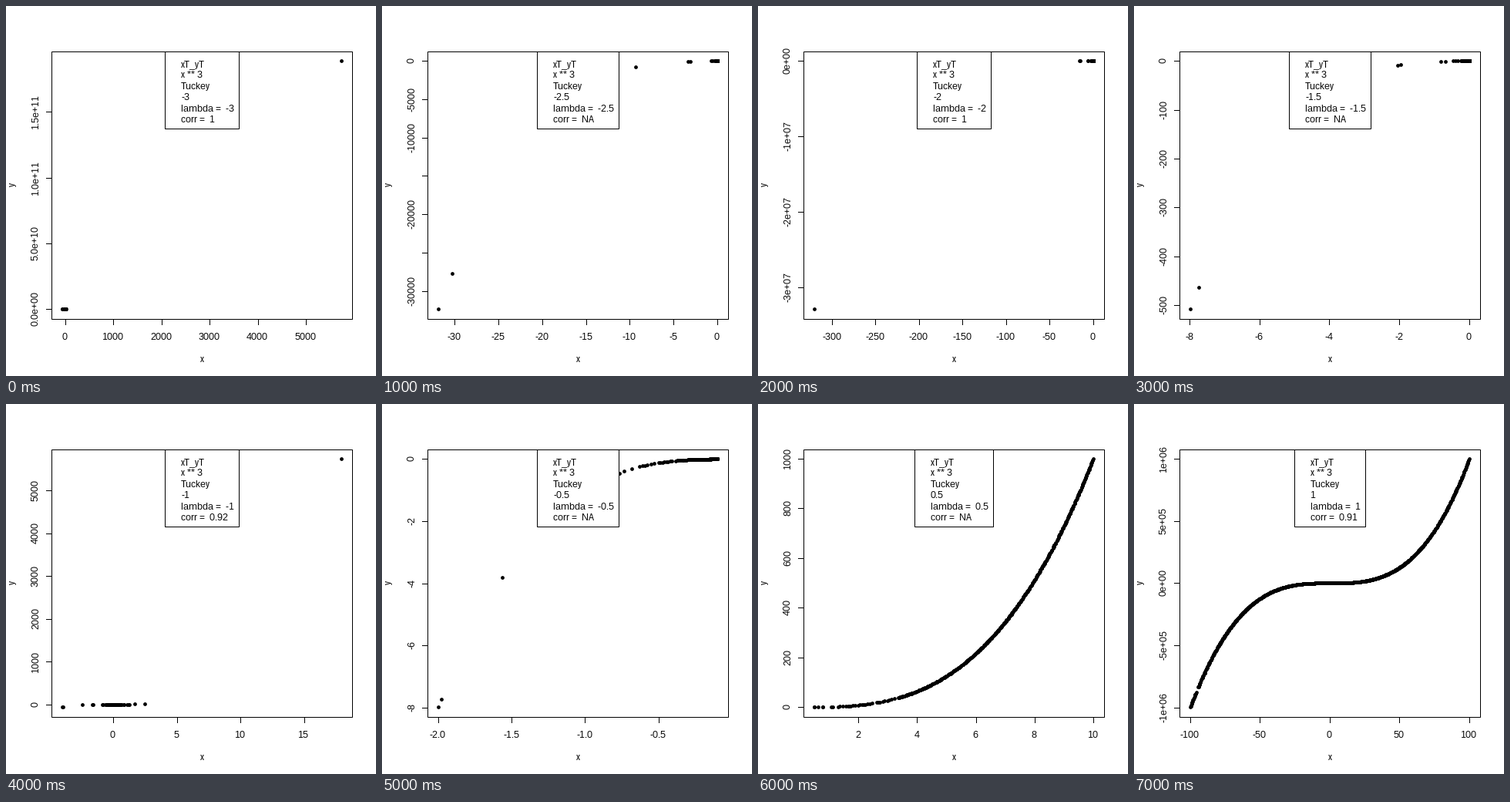
These frames come from a looping animation (480x480 px, 8000 ms). A matplotlib script:

```python
import numpy as np
import matplotlib.pyplot as plt
from matplotlib.animation import FuncAnimation
from matplotlib.patches import Rectangle

SIZE = 480
PT = 0.72  # points per pixel at 100 dpi
LEFT, RIGHT, TOP, BOTTOM = 59.04, 449.76, 59.04, 406.56
MID_X, MID_Y = (LEFT + RIGHT) / 2, (TOP + BOTTOM) / 2
DOT = 4.8

plt.rcParams.update({
    "font.family": "Liberation Sans",
    "font.size": 12 * PT,
    # whole-pixel glyph advances without kerning
    "text.hinting": "native",
    "text.hinting_factor": 1,
    "text.kerning_factor": 6,
})

# lambda, x tick step and format, y tick step and format
SCENES = [
    (-3, 1000, "%d", 5e10, "%.1e"),
    (-2.5, 5, "%d", 5000, "%d"),
    (-2, 50, "%d", 1e7, "%.0e"),
    (-1.5, 2, "%d", 100, "%d"),
    (-1, 5, "%d", 1000, "%d"),
    (-0.5, 0.5, "%.1f", 2, "%d"),
    (0.5, 2, "%d", 200, "%d"),
    (1, 50, "%d", 5e5, "%.0e"),
]

SMALL = [0.2504, 0.2556, 0.41, 0.621, 0.637, 1.15, 1.3, 1.7, 1.86, 2.14,
         2.52, 2.72, 2.87, 3.03, 3.32, 3.6, 4.0, 4.2, 4.5, 4.75, 5.0, 5.3,
         5.7, 6.05, 6.9, 7.2, 7.5, 8.0, 8.4, 8.9, 9.3, 9.8, 10.4]


def scattered(rng, n):
    """Sorted-ish random values over 0..1 without large holes."""
    return np.clip((np.arange(n) + rng.uniform(-1.5, 1.5, n)) / n, 0, 1)


def make_sample():
    rng = np.random.default_rng(7)
    pos = 11.3 + 88.6 * scattered(rng, 460) ** 1.2
    neg = -0.6 - 99.3 * scattered(rng, 500) ** 1.1
    neg = neg[(neg < -95.7) | (neg > -94.4)]
    return np.concatenate([SMALL, pos, neg, [-0.05587, -0.4, -99.9, 99.9]])


SAMPLE = make_sample()


def transform(v, lam):
    with np.errstate(invalid="ignore"):
        return np.sign(lam) * np.power(v, float(lam))


def scale(values, start, end):
    """Map the data range, padded by 4 %, to pixels."""
    lo, hi = np.nanmin(values), np.nanmax(values)
    pad = 0.04 * (hi - lo)
    lo, hi = lo - pad, hi + pad
    return lo, hi, lambda v: start + (v - lo) / (hi - lo) * (end - start)


def ticks(lo, hi, step, fmt, to_px):
    """Yield tick pixels and labels; crowded labels come out empty."""
    last, last_len = None, 0
    for k in range(int(np.ceil(lo / step)), int(np.floor(hi / step)) + 1):
        p = to_px(k * step)
        label = fmt % (k * step)
        half = 6.5 * (len(label) + last_len) / 2
        if last is not None and abs(p - last) - half < 12:
            label = ""
        else:
            last, last_len = p, len(label)
        yield p, label


fig = plt.figure(figsize=(SIZE / 100, SIZE / 100), dpi=100, facecolor="white")
ax = fig.add_axes([0, 0, 1, 1])


def line(xs, ys):
    ax.plot(xs, ys, color="black", lw=PT, snap=False, solid_capstyle="butt")


def box(x0, y0, x1, y1, fill, z):
    x0, y0, x1, y1 = (np.floor(v) + 0.5 for v in (x0, y0, x1, y1))
    ax.add_patch(Rectangle((x0, y0), x1 - x0, y1 - y0, fc=fill, ec="black",
                           lw=PT, snap=False, zorder=z))


def label_at(x, y, s, rotation=0, ha="center"):
    ax.text(x, y, s, rotation=rotation, rotation_mode="anchor", ha=ha,
            va="baseline", color="black", zorder=6)


def legend(lam, corr):
    width = 92 + (4 if lam < 0 else 0) + (10 if lam % 1 else 0)
    x0 = MID_X - width / 2
    box(x0, TOP, x0 + width, 159.8, "white", 5)
    rows = ["xT_yT", "x ** 3", "Tuckey", f"{lam:g}", f"lambda =  {lam:g}",
            "corr =  " + ("NA" if np.isnan(corr) else f"{round(corr, 2):g}")]
    for i, row in enumerate(rows):
        label_at(x0 + 20.6, round(79 + 14.4 * i), row, ha="left")


def draw(i):
    lam, x_step, x_fmt, y_step, y_fmt = SCENES[i]
    ax.clear()
    ax.set_xlim(0, SIZE)
    ax.set_ylim(SIZE, 0)
    ax.axis("off")

    x = transform(SAMPLE, lam)
    y = x ** 3
    x_lo, x_hi, to_x = scale(x, LEFT, RIGHT)
    y_lo, y_hi, to_y = scale(y, BOTTOM, TOP)

    ax.scatter(np.floor(to_x(x)) + 0.2, np.floor(to_y(y)) + 0.2,
               s=(DOT * PT) ** 2, c="black", linewidths=0, zorder=3)
    box(LEFT, TOP, RIGHT, BOTTOM, "none", 4)

    for p, s in ticks(x_lo, x_hi, x_step, x_fmt, to_x):
        t = np.floor(p) + 0.5
        line([t, t], [406, 414])
        label_at(p - 1, 433, s)
    for p, s in ticks(y_lo, y_hi, y_step, y_fmt, to_y):
        t = np.floor(p) + 0.5
        line([52, 60], [t, t])
        label_at(42, p - 1, s, 90)
    label_at(MID_X - 0.5, 462, "x")
    label_at(12, MID_Y - 1, "y", 90)

    legend(lam, np.corrcoef(x, y)[0, 1])
    return []


anim = FuncAnimation(fig, draw, frames=len(SCENES), init_func=lambda: [],
                     interval=1000, repeat=True, repeat_delay=0)
plt.show()
```
